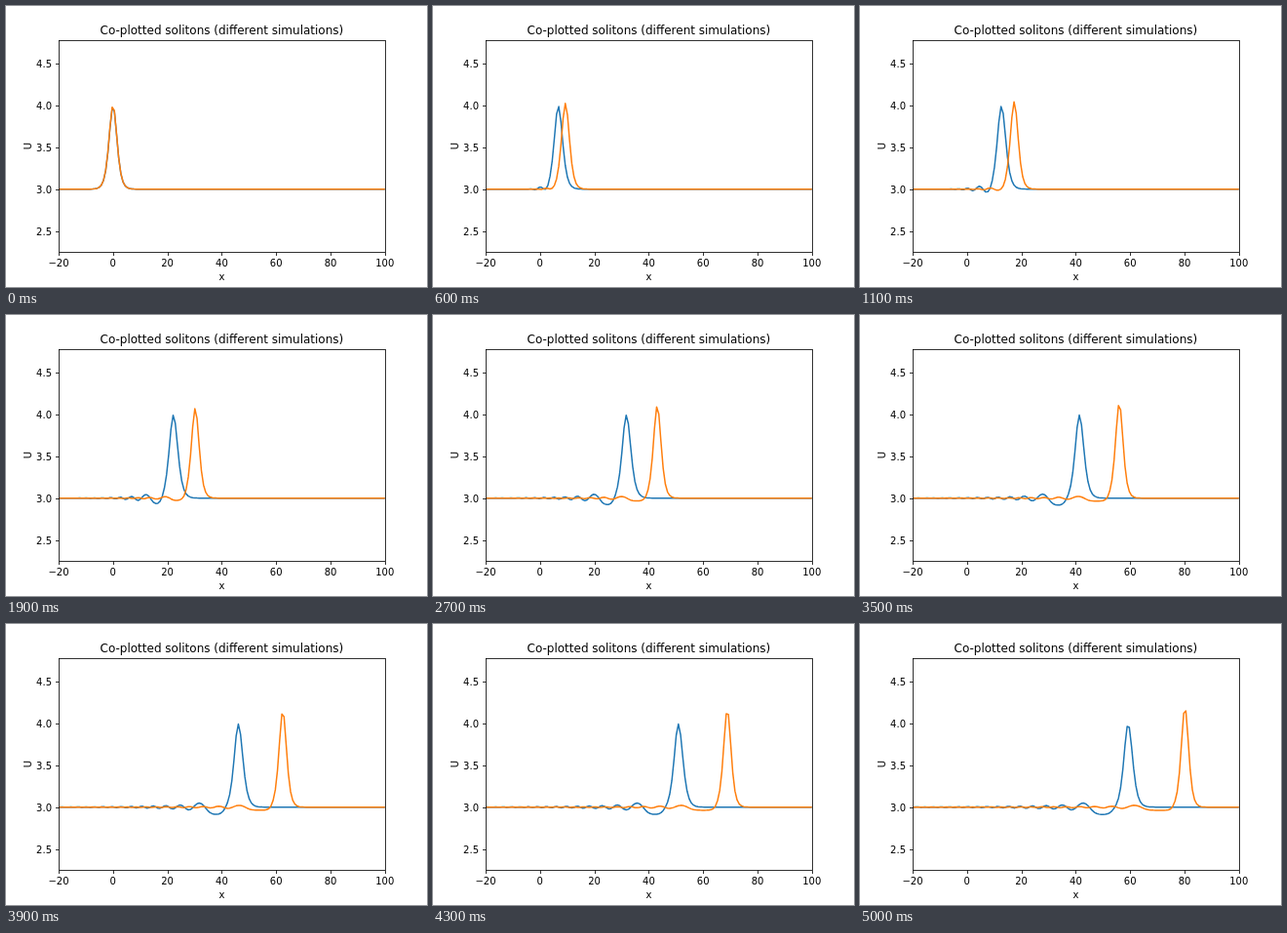
Write an HTML page that moves like this. It is 432 by 288 pixels and loops after 5100 ms.

```html
<!DOCTYPE html>
<html lang="en">
<head>
<meta charset="utf-8">
<title>Co-plotted solitons</title>
<style>
  html, body { margin: 0; width: 100%; height: 100%; overflow: hidden; background: #fff; }
  svg { display: block; width: 432px; height: 288px; }
  text { font: 10px "DejaVu Sans", sans-serif; fill: #000; text-anchor: middle; }
  .title { font-size: 12px; }
  .ylab { text-anchor: end; }
  .axis { fill: none; stroke: #000; stroke-width: .8; }
  .curve { fill: none; stroke-width: 1.5; stroke-linejoin: round; }
</style>
</head>
<body>
<svg viewBox="0 0 432 288">
  <clipPath id="plot"><rect x="54" y="34.56" width="334.8" height="217.44"/></clipPath>
  <g clip-path="url(#plot)">
    <path id="blue" class="curve" stroke="#1f77b4"/>
    <path id="orange" class="curve" stroke="#ff7f0e"/>
  </g>
  <path id="ticks" class="axis"/>
  <rect class="axis" x="54.5" y="35.5" width="335" height="217"/>
  <text class="title" x="221.4" y="29">Co-plotted solitons (different simulations)</text>
  <text x="221.4" y="281">x</text>
  <text transform="translate(25.5 143.5) rotate(-90)">U</text>
  <g id="labels"></g>
</svg>
<script>
const LOOP = 5100, STEP = 100;
const $ = id => document.getElementById(id);
const px = x => 54 + (x + 20) * 2.79;
const py = u => 187.7 - (u - 3) * 86;

// Axis ticks and labels
let ticks = '', labels = '';
for (let x = -20; x <= 100; x += 20) {
  ticks += `M${Math.round(px(x)) + .5} 252.5v3.5`;
  labels += `<text x="${px(x)}" y="267">${String(x).replace('-', '\u2212')}</text>`;
}
for (let u = 2.5; u <= 4.5; u += .5) {
  const y = Math.round(py(u)) + .5;
  ticks += `M54.5 ${y}h-3.5`;
  labels += `<text class="ylab" x="47" y="${y + 3.5}">${u.toFixed(1)}</text>`;
}
$('ticks').setAttribute('d', ticks);
$('labels').innerHTML = labels;

// Running integral of the Airy function, stepped down from z = 6
const H = .01, Z_MAX = 6, Z_MIN = -45;
const airySum = [1];
let prev = 9.94769e-6, cur = 1.019833e-5, sum = 1;
for (let z = Z_MAX - H; z > Z_MIN; z -= H) {
  sum -= (prev + cur) / 2 * H;
  airySum.push(sum);
  [prev, cur] = [cur, 2 * cur - prev + H * H * z * cur];
}
const airyStep = z => {
  const i = Math.round((Z_MAX - z) / H);
  return airySum[Math.min(Math.max(i, 0), airySum.length - 1)];
};

const sech2 = z => 1 / Math.cosh(z) ** 2;
const settle = (t, tau) => 1 - Math.exp(-t / tau);

const waves = {
  blue: t => ({
    peak: 11.95 * t - .5 * settle(t, .3),
    amp: .99,
    left: 1.95 + .1 * settle(t, 1),
    right: 1.95 + .25 * settle(t, 1),
    front: 10.43 * t - 3.8,
    scale: 2.42 * (t / 5) ** .38,
    depth: .18 * settle(t, .8),
    limit: .55,
    gap: 3 + .5 * t,
    soft: .7 + .25 * t
  }),
  orange: t => ({
    peak: 16.1 * t - .35 * settle(t, .3),
    amp: 1 + .038 * t,
    left: 1.95 - .03 * t,
    right: 1.95 - .03 * t,
    front: 14.3 * t - 3.9,
    scale: 2.6 * (t / 5) ** .4,
    depth: .08 * settle(t, 1),
    limit: .5,
    gap: 3 + .25 * t,
    soft: .9
  })
};

// Dispersive tail: a shelf behind the pulse with ripples trailing it
function tail(x, w) {
  if (!w.depth) return 0;
  const z = (x - w.front) / w.scale;
  let a = airyStep(z);
  if (a > 0 && z > -2.4) a = w.limit * Math.tanh(a / w.limit);
  const k = Math.sqrt(Math.max(-z, 0)) / w.scale;
  const fade = Math.exp(-((k / 2) ** 4));
  const edge = (1 - Math.tanh((x - w.peak + w.gap) / w.soft)) / 2;
  return -w.depth * a * fade * edge;
}

function curve(w) {
  const pts = [];
  for (let x = -20.3; x < 101; x += .8) {
    const d = x - w.peak;
    const u = 3 + w.amp * sech2(d / (d < 0 ? w.left : w.right)) + tail(x, w);
    pts.push(px(x).toFixed(2) + ' ' + py(u).toFixed(2));
  }
  return 'M' + pts.join('L');
}

const start = performance.now();
let shown = -1;
function draw(now) {
  const step = Math.floor(Math.max(now - start, 0) % LOOP / STEP);
  if (step !== shown) {
    shown = step;
    for (const id in waves) $(id).setAttribute('d', curve(waves[id](step * STEP / 1000)));
  }
  requestAnimationFrame(draw);
}
draw(start);
</script>
</body>
</html>
```
